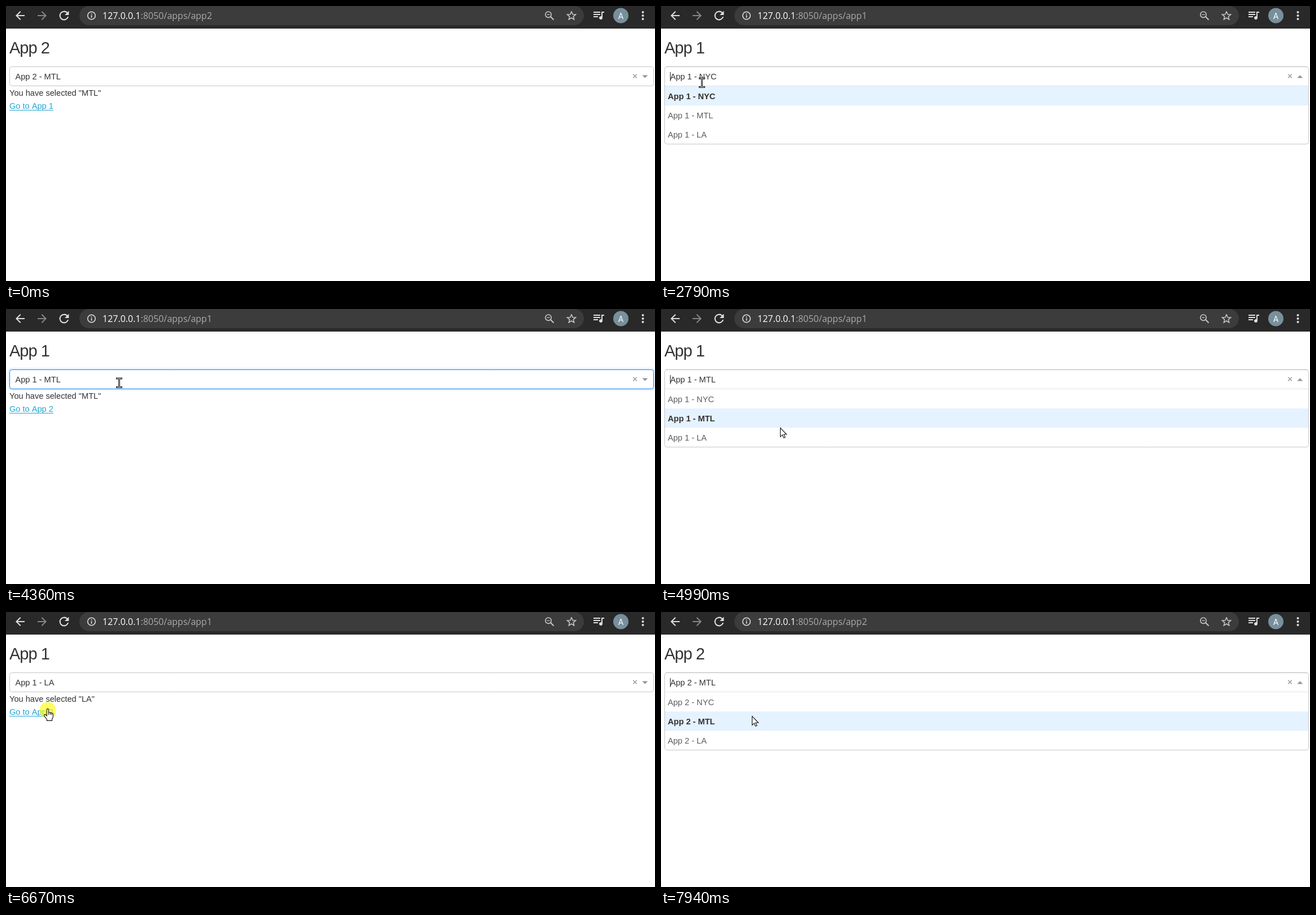
Animation, 1150 px wide and 487 px high, one loop 8000 ms. Source, as an HTML page with a canvas:

```html
<!DOCTYPE html>
<html lang="en">
<head>
<meta charset="utf-8">
<title>Multi-page app</title>
<style>
html, body { margin: 0; width: 100%; height: 100%; overflow: hidden; background: #fff; }
canvas { display: block; }
</style>
</head>
<body>
<canvas id="stage" width="1150" height="487"></canvas>
<script>
const ctx = document.getElementById('stage').getContext('2d');
const LOOP = 8000, STEP = 77.6;
const SANS = '"Liberation Sans", Arial, sans-serif';
const BODY = '14.6px ' + SANS, BOLD = 'bold ' + BODY;
const INK = '#323232', MUTED = '#5c5c5c', LINK = '#1fa5d1', BORDER = '#c6c6c6';
const CITIES = ['NYC', 'MTL', 'LA'];
const MENU_TOP = 142, ROW = 34.2;

// Pointer moves: leave and arrive times, then the place reached.
const ENTRY = { at: 70, x: 262, y: 310 };
const MOVES = [
  [70, 690, 33, 101],
  [915, 1620, 60, 171],
  [2100, 2400, 72, 133],
  [2710, 3490, 86, 180],
  [3650, 4110, 200, 130],
  [4520, 5120, 213, 225],
  [5420, 6270, 89, 178],
  [6360, 6510, 74, 173],
  [6980, 7290, 140, 131],
  [7520, 7900, 161, 184]
];
const CLICKS = [1850, 2540, 3550, 4490, 5270, 6660, 7440];
const PRESS = 90, CHOOSE = 60, ROUTE = 140, MOUNT = 235, REPLY = 310, BLINK = 530;

const ICON = {
  back: 'M20 11H7.83l5.59-5.59L12 4l-8 8 8 8 1.41-1.41L7.83 13H20z',
  next: 'M4 11h12.17l-5.59-5.59L12 4l8 8-8 8-1.41-1.41L16.17 13H4z',
  reload: 'M17.65 6.35A8 8 0 1 0 19.73 14h-2.08A6 6 0 1 1 12 6c1.66 0 3.14.69 4.22 1.78L13 11h7V4z',
  list: 'M15 6H3v2h12zm0 4H3v2h12zM3 16h8v-2H3zM17 6v8.18a3 3 0 1 0 2 2.82V8h3V6z'
};
const ARROW = new Path2D('M.5 .5V16.3L4 12.9 6.6 18.4 9.1 17.3 6.5 12H11.5Z');
const HAND = new Path2D('M-1.6 -.6Q0 -2.6 1.5 -.6V5Q3.3 3.8 4.4 5.5 6 4.5 7 6.2 9 5.5 9.4 7.6V13L7.6 16.5V19.4H-1.6V17L-6 11.4Q-7 8.6 -4.6 8.4L-1.6 11ZM1.5 5V9M4.4 5.5V9M7 6.2V9.5');

const clamp = v => Math.min(1, Math.max(0, v));
const ease = k => k * k * (3 - 2 * k);

function text(str, x, y, color = INK, font = BODY) {
  ctx.font = font;
  ctx.fillStyle = color;
  ctx.fillText(str, x, y);
  return ctx.measureText(str).width;
}

function rect(x, y, w, h, color) {
  ctx.fillStyle = color;
  ctx.fillRect(x, y, w, h);
}

function disc(x, y, r, color) {
  ctx.fillStyle = color;
  ctx.beginPath();
  ctx.arc(x, y, r, 0, 7);
  ctx.fill();
}

function ring(x, y, r, color, width) {
  ctx.strokeStyle = color;
  ctx.lineWidth = width;
  ctx.beginPath();
  ctx.arc(x, y, r, 0, 7);
  ctx.stroke();
}

function line(points, color, width) {
  ctx.strokeStyle = color;
  ctx.lineWidth = width;
  ctx.beginPath();
  points.forEach(([x, y]) => ctx.lineTo(x, y));
  ctx.stroke();
}

function outline(x, y, w, h, radii, color, width = 1) {
  ctx.strokeStyle = color;
  ctx.lineWidth = width;
  ctx.beginPath();
  ctx.roundRect(x, y, w, h, radii);
  ctx.stroke();
}

function icon(name, x, y, color, scale = 1) {
  ctx.save();
  ctx.translate(x, y);
  ctx.scale(scale, scale);
  ctx.translate(-12, -12);
  ctx.fillStyle = color;
  ctx.fill(new Path2D(ICON[name]));
  ctx.restore();
}

function star(x, y, color) {
  const points = [];
  for (let i = 0; i < 11; i++) {
    const r = i % 2 ? 3.5 : 8, a = i * Math.PI / 5 - Math.PI / 2;
    points.push([x + r * Math.cos(a), y + r * Math.sin(a)]);
  }
  line(points, color, 1.5);
}

function drawToolbar(url) {
  const bright = '#dedede', soft = '#c8c8c8';
  rect(0, 0, 1150, 40, '#292929');
  ctx.fillStyle = '#3c3c3c';
  ctx.beginPath();
  ctx.roundRect(130, 0, 894, 34, 17);
  ctx.fill();
  icon('back', 25, 17, bright);
  icon('next', 64, 17, '#868686');
  icon('reload', 103, 17, bright, 1.05);
  ring(151.5, 17, 6.8, bright, 1.6);
  rect(150.7, 13.2, 1.7, 1.7, bright);
  rect(150.7, 16.2, 1.7, 4.6, bright);
  const font = '16px "Open Sans", "Noto Sans", sans-serif';
  const host = text('127.0.0.1', 171, 23, '#fff', font);
  text(':8050/apps/app' + url, 171 + host, 23, '#a8abae', font);
  ring(961, 15.2, 5.2, soft, 1.6);
  line([[958.5, 15.2], [963.5, 15.2]], soft, 1.3);
  line([[965, 19], [970.5, 24.5]], soft, 2);
  star(1002, 17.5, soft);
  icon('list', 1050, 16, bright);
  disc(1089.5, 17, 13.5, '#78909c');
  ctx.textAlign = 'center';
  text('A', 1089.5, 22.5, '#fff', '14.5px Roboto, sans-serif');
  ctx.textAlign = 'left';
  for (const y of [11, 17, 23]) disc(1128.5, y, 2, bright);
}

function pointerAt(t) {
  if (t < ENTRY.at) return null;
  let { x, y } = ENTRY;
  for (const [leave, arrive, tx, ty] of MOVES) {
    const k = ease(clamp((t - leave) / (arrive - leave)));
    x += (tx - x) * k;
    y += (ty - y) * k;
  }
  return [Math.round(x), Math.round(y)];
}

const linkBase = s => s.said ? 182 : 158.8;

function overLink(s, x, y) {
  return !s.open && x >= 6 && x < 84 && Math.abs(y - linkBase(s) + 5) < 9;
}

function rowAt(y) {
  const row = Math.floor((y - MENU_TOP) / ROW);
  return row < CITIES.length ? row : -1;
}

// Replays every click so far: a link changes page, the select opens, a row chooses.
function stateAt(t) {
  const saved = { 1: 'NYC', 2: 'MTL' };
  const s = { app: 2, url: 2, said: true, open: false, focus: false, mounted: -LOOP };
  for (const at of CLICKS.filter(c => c <= t)) {
    const [x, y] = pointerAt(at), age = t - at;
    s.pressed = age < PRESS;
    if (overLink(s, x, y)) {
      s.focus = false;
      const target = 3 - s.app;
      if (age >= ROUTE) s.url = target;
      if (age >= MOUNT) {
        s.app = target;
        s.mounted = at + MOUNT;
        s.said = age >= REPLY;
      }
    } else if (s.open && rowAt(y) >= 0) {
      if (age >= CHOOSE) {
        saved[s.app] = CITIES[rowAt(y)];
        s.open = false;
      }
    } else {
      s.open = s.focus = true;
      s.caret = at + ROUTE;
    }
  }
  s.value = saved[s.app];
  return s;
}

function drawSelect(s, t) {
  const active = s.focus && !s.open;
  if (active) outline(4.5, 105.5, 1145, 38, 6, 'rgba(0,126,255,.1)', 3);
  outline(6.5, 107.5, 1141, 34, s.open ? [4, 4, 0, 0] : 4, active ? '#1b80e6' : BORDER);
  if (s.open) rect(9, 107, 1136, 1, '#b3b3b3');
  text(`App ${s.app} - ${s.value}`, 16.5, 129.7);
  if (s.open && (t - s.caret) % (2 * BLINK) < BLINK) rect(16, 117, 1, 16, '#222');

  ctx.globalAlpha = clamp((t - s.mounted) / 200);
  line([[1111.2, 120.8], [1117.8, 127.4]], '#8f9aa0', 1.4);
  line([[1111.2, 127.4], [1117.8, 120.8]], '#8f9aa0', 1.4);
  ctx.globalAlpha = 1;

  const dir = s.open ? -1 : 1;
  ctx.fillStyle = '#8a979f';
  ctx.beginPath();
  for (const [dx, dy] of [[-5, -2.5], [5, -2.5], [0, 2.5]]) ctx.lineTo(1132.3 + dx, 125 + dy * dir);
  ctx.fill();
}

function drawMenu(s, y) {
  const over = rowAt(y);
  const lit = over >= 0 ? over : CITIES.indexOf(s.value);
  rect(7, 142, 1140, 102, '#fff');
  rect(7, MENU_TOP + lit * ROW, 1140, ROW, '#e5f2ff');
  outline(6.5, 141.5, 1141, 103, [0, 0, 4, 4], BORDER);
  rect(7, 141, 1140, 1, '#e4e4e4');
  CITIES.forEach((city, i) => {
    const chosen = city === s.value;
    text(`App ${s.app} - ${city}`, 12, 164.7 + i * ROW, chosen ? INK : MUTED, chosen ? BOLD : BODY);
  });
}

function drawPage(s, t, y) {
  ctx.letterSpacing = '-0.97px';
  text('App ' + s.app, 6, 83.7, INK, '29px ' + SANS);
  ctx.letterSpacing = '0px';
  drawSelect(s, t);
  if (s.open) return drawMenu(s, y);
  if (s.said) text(`You have selected "${s.value}"`, 6, 158.8);
  const base = linkBase(s);
  const width = text('Go to App ' + (3 - s.app), 6, base, LINK);
  rect(6, Math.round(base) + 2, width, 1, LINK);
}

function drawBeam(x, y) {
  for (const [color, width, pad] of [['#111', 3, 1], ['#ddd', 1, 0]]) {
    const w = 4.5 + pad;
    for (const dy of [-7.5, 8]) line([[x - w, y + dy], [x + w, y + dy]], color, width);
    line([[x, y - 7.5], [x, y + 8]], color, width);
  }
}

function drawPointer(s, x, y) {
  if (y >= 107 && y < MENU_TOP) return drawBeam(x + 0.5, y + 0.5);
  const shape = overLink(s, x, y) ? HAND : ARROW;
  ctx.save();
  ctx.translate(x, y);
  ctx.fillStyle = '#fff';
  ctx.strokeStyle = '#111';
  ctx.lineWidth = 1.1;
  ctx.fill(shape);
  ctx.stroke(shape);
  ctx.restore();
}

function draw(now) {
  const t = Math.floor((now % LOOP + 20) / STEP) * STEP;
  const s = stateAt(t), pos = pointerAt(t);
  rect(0, 0, 1150, 487, '#fff');
  drawToolbar(s.url);
  drawPage(s, t, pos ? pos[1] : 0);
  if (!pos) return;
  if (s.pressed) disc(pos[0], pos[1] + 1, 14.5, 'rgba(255,252,0,.62)');
  drawPointer(s, ...pos);
}

const start = performance.now();
function tick() {
  draw(performance.now() - start);
  requestAnimationFrame(tick);
}
tick();
</script>
</body>
</html>
```
